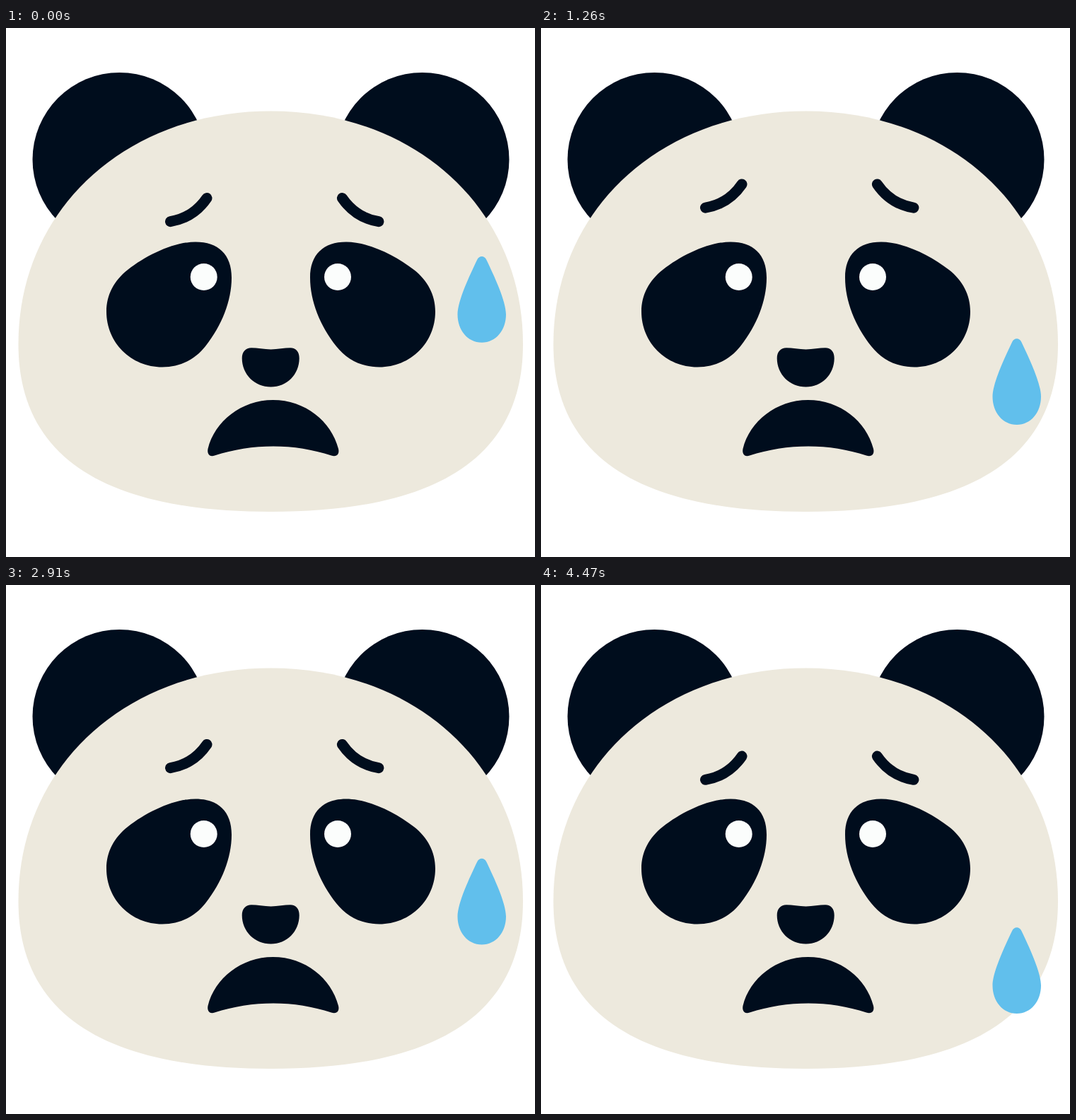
These frames come from a looping animation (748 px wide and 748 px high, 4.5 s). An HTML page:

```html
<!DOCTYPE html>
<html lang="en">
<head>
<meta charset="utf-8">
<title>Worried panda</title>
<style>
  html, body { margin: 0; height: 100%; overflow: hidden; background: #fff; }
  svg { display: block; width: 100%; height: 100%; }
</style>
</head>
<body>
<svg viewBox="0 0 748 748" fill="#000d1d">
  <defs>
    <path id="eye" d="M142 401C142 377 153 357 172 342C199 321 237 302.5 268 302.5C300 302.5 319 320 319 353C319 386 305 421 282 450C267 469 246 479.5 221 479.5C177 479.5 142 445 142 401Z"/>
    <path id="brow" d="M284 240.5C272 258 255 270 232.5 273.7" fill="none" stroke="#000d1d" stroke-width="15" stroke-linecap="round"/>
  </defs>

  <circle cx="160.5" cy="186" r="123"/>
  <circle cx="588.5" cy="186" r="123"/>
  <path fill="#ede9dd" d="M374.5 117.5C580 117.5 731 257 731 447C731 618 592 684 374.5 684S17.5 618 17.5 447C17.5 257 169 117.5 374.5 117.5Z"/>

  <use href="#eye"/>
  <use href="#eye" transform="translate(749) scale(-1 1)"/>
  <g fill="#fbfdfc">
    <circle cx="279.7" cy="352" r="19"/>
    <circle cx="469" cy="352" r="19"/>
  </g>

  <path d="M347 452.3C355 452.3 365 454.5 374.5 454.5S394 452.3 402 452.3C410 452.3 414.7 458 414.7 467C414.7 490 397 507.5 374.5 507.5S333.7 490 333.7 467C333.7 458 339 452.3 347 452.3Z"/>
  <path d="M285.5 595C295 556 333 526 377.5 526C423 526 460 556 470 595C472 603 467 607 460 604.5C434 596 406 591.5 378 591.5C350 591.5 321 596 295 604.5C288 607.3 284 602 285.5 595Z"/>

  <g id="brows">
    <use href="#brow"/>
    <use href="#brow" transform="translate(759.4) scale(-1 1)"/>
  </g>
  <path id="drop" fill="#61bfec" d="M666.3 327.5C669 321.5 676.5 321.5 679.2 327.5C690 350 707 386 707 405C707 427 693 444.7 672.8 444.7S638.5 427 638.5 405C638.5 386 655.5 350 666.3 327.5Z"/>
</svg>
<script>
  const LOOP = 4500, STEP = 30;
  // Keyframes: [time in ms, vertical offset]
  const browKeys = [[0, 0], [1050, -24.4], [2145, 0.9], [3325, -23.7], [LOOP, 2.3]];
  const dropKeys = [[0, 0], [1770, 163.2], [1890, 0], [LOOP, 163.2]];

  function offsetAt(keys, t) {
    const i = keys.findIndex(([time]) => time > t);
    const [t0, y0] = keys[i - 1], [t1, y1] = keys[i];
    return y0 + (y1 - y0) * (t - t0) / (t1 - t0);
  }

  const shift = (id, y) =>
    document.getElementById(id).setAttribute('transform', `translate(0 ${y})`);

  function draw() {
    const t = Math.floor(performance.now() % LOOP / STEP) * STEP;
    shift('brows', offsetAt(browKeys, t));
    shift('drop', offsetAt(dropKeys, t));
    requestAnimationFrame(draw);
  }
  draw();
</script>
</body>
</html>
```
